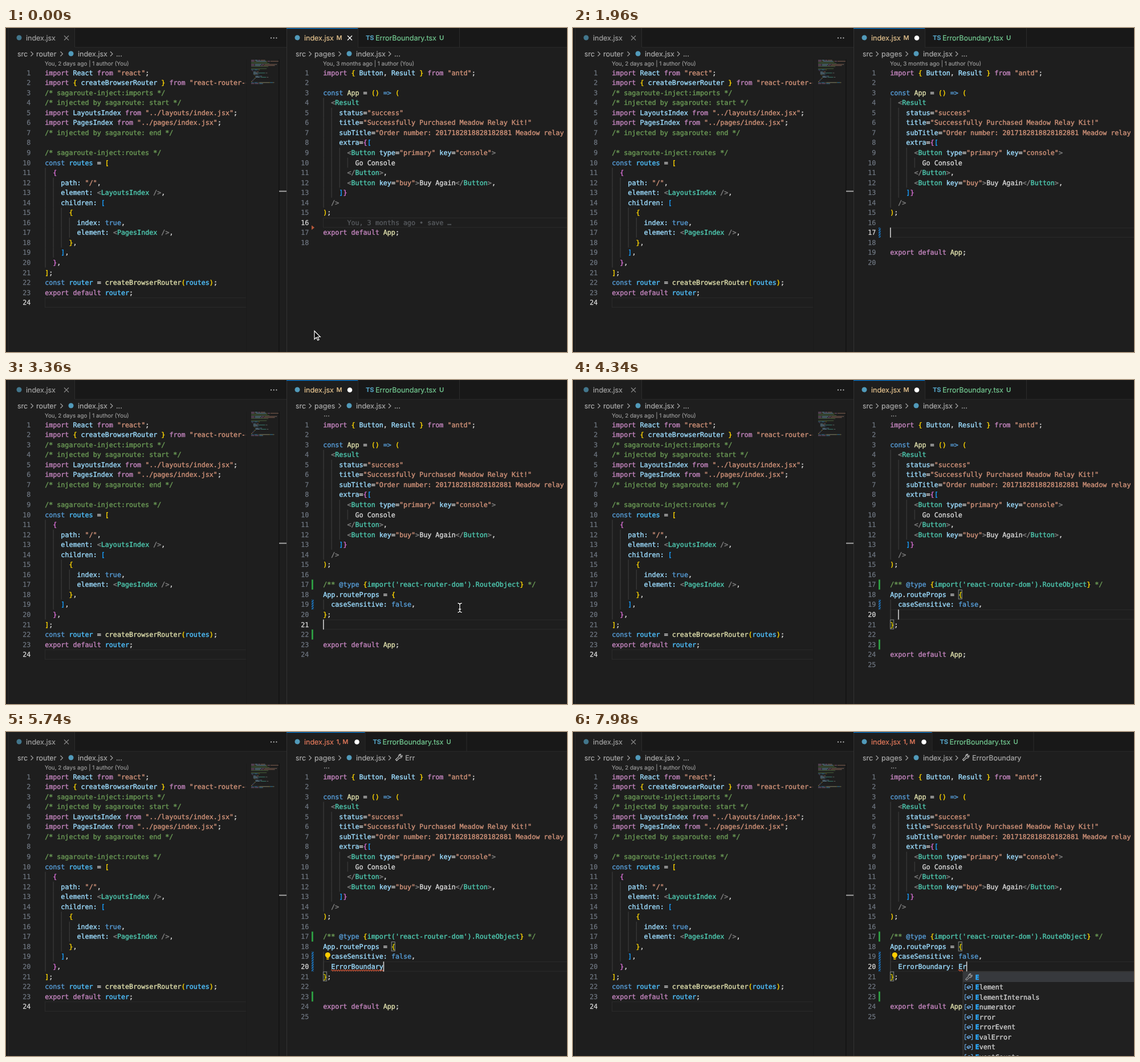
Animation of 984 by 569 pixels, one loop 8 s. Source, as an HTML page:

```html
<!DOCTYPE html>
<html lang="en">
<head>
<meta charset="utf-8">
<title>Route editor</title>
<style>
  html, body { margin: 0; width: 100%; height: 100%; overflow: hidden; background: #1e1e1e; }
  svg { display: block; }
  text { white-space: pre; text-rendering: geometricPrecision; font: 12.5px Inter, sans-serif; stroke-width: .2; }
  .code { font: 11.69px "DejaVu Sans Mono", monospace; stroke-width: .4; }
  .lens { font-size: 9.85px; }
  .badge { font-size: 11px; font-weight: 500; }
  .num { text-anchor: end; stroke-width: .25; }
  .bold { font-weight: 700; }
</style>
</head>
<body>
<svg width="984" height="569" viewBox="0 0 984 569">
  <defs>
    <clipPath id="leftClip"><rect x="0" y="0" width="422" height="569"/></clipPath>
    <clipPath id="mapClip"><rect x="430" y="50" width="48" height="60"/></clipPath>
    <pattern id="hatch" width="3" height="3" patternUnits="userSpaceOnUse" patternTransform="rotate(-45)">
      <rect width="3" height="1.7" fill="#1b81d6"/>
    </pattern>
  </defs>
  <g id="left"></g>
  <g id="right"></g>
</svg>
<script>
const LOOP = 8000, TICK = 70;
const CHAR = 7.04, ROW = 17.54, TOP = 69.9, LEFT = 68.2, RIGHT = 556.2;

const routerFile = `import React from "react";
import { createBrowserRouter } from "react-router-dom";
/* sagaroute-inject:imports */
/* injected by sagaroute: start */
import LayoutsIndex from "../layouts/index.jsx";
import PagesIndex from "../pages/index.jsx";
/* injected by sagaroute: end */

/* sagaroute-inject:routes */
const routes = [
  {
    path: "/",
    element: <LayoutsIndex />,
    children: [
      {
        index: true,
        element: <PagesIndex />,
      },
    ],
  },
];
const router = createBrowserRouter(routes);
export default router;
`.split("\n");

const pageHead = `import { Button, Result } from "antd";

const App = () => (
  <Result
    status="success"
    title="Successfully Purchased Meadow Relay Kit!"
    subTitle="Order number: 2017182818828182881 Meadow relay setup
    extra={[
      <Button type="primary" key="console">
        Go Console
      </Button>,
      <Button key="buy">Buy Again</Button>,
    ]}
  />
);`.split("\n");
const pageTail = ["", "export default App;", ""];

const propsOpen = ["", "/** @type {import('react-router-dom').RouteObject} */", "App.routeProps = {", "  caseSensitive: false,"];
const withProp = line => [...propsOpen, "  " + line, "};", ""];
const words = ["E", "Element", "ElementInternals", "Enumerator", "Error", "ErrorEvent", "EvalError", "Event", "EventCounts"];
const erWords = ["ErrorBoundary", "Error", "ErrorEvent", "EvalError", "Enumerator"];

const steps = [
  [0, { mid: [], line: 16, col: 0, caret: false, blame: "You, 3 months ago • save …", marks: [["del", 17]], crumb: "" }],
  [700, { line: 15, col: 2, caret: true, blame: "" }],
  [910, { blame: "You, 3 months ago • save" }],
  [1190, { caret: false }],
  [1400, { mid: [""], line: 16, col: 0, caret: true, blame: "", marks: [["del", 18]] }],
  [1470, { dirty: true }],
  [1750, { mid: ["", ""], line: 17, marks: [["del", 19]] }],
  [1890, { marks: [["mod", 17]] }],
  [2240, { mid: [...propsOpen, "};", ""], line: 21 }],
  [2450, { folded: true, marks: [["add", 17], ["mod", 19], ["add", 22]] }],
  [2730, { caret: false }],
  [3220, { caret: true }],
  [3500, { line: 19, col: 23, match: true }],
  [3990, { caret: false }],
  [4130, { mid: withProp(""), line: 20, col: 2, caret: true, marks: [["add", 17], ["mod", 19], ["add", 23]] }],
  [4410, { marks: [["add", 17], ["mod", 19], ["mod", 20], ["add", 23]] }],
  [4550, { mid: withProp("E"), col: 3 }],
  [4620, { popup: { col: 3, list: words.slice(1), typed: 1 } }],
  [4760, { mid: withProp("Er"), col: 4 }],
  [4900, { crumb: "E", error: true, wave: [20, 2, 2] }],
  [5040, { crumb: "Er", popup: { col: 3, list: erWords, typed: 2 } }],
  [5320, { mid: withProp("Err"), col: 5, wave: [20, 2, 3], popup: { col: 3, list: erWords.slice(0, 3), typed: 3 } }],
  [5670, { crumb: "Err" }],
  [5740, { mid: withProp("ErrorBoundary"), col: 15, wave: [20, 2, 13], popup: null, bulb: true }],
  [6090, { crumb: "ErrorBoundary" }],
  [6230, { caret: false }],
  [6580, { mid: withProp("ErrorBoundary:"), col: 16, caret: true }],
  [6790, { mid: withProp("ErrorBoundary: "), col: 17 }],
  [7070, { wave: [21, 0, 1] }],
  [7280, { caret: false }],
  [7490, { mid: withProp("ErrorBoundary: E"), col: 18, caret: true }],
  [7560, { popup: { col: 18, list: words, typed: 1 } }],
  [7840, { wave: [20, 17, 1] }],
  [7980, { mid: withProp("ErrorBoundary: Er"), col: 19 }]
];

const rowTop = n => TOP + (n - 1) * ROW;
const baseline = n => rowTop(n) + 12.8;
const escape = s => s.replace(/&/g, "&amp;").replace(/</g, "&lt;");
const text = (x, y, s, fill, cls = "") =>
  `<text x="${x}" y="${y}" fill="${fill}" stroke="${fill}" class="${cls}">${escape(s)}</text>`;
const rect = (x, y, w, h, fill, more = "") => `<rect x="${x}" y="${y}" width="${w}" height="${h}" fill="${fill}" ${more}/>`;
const path = (x, y, d, stroke, width = 1.1, fill = "none") =>
  `<path transform="translate(${x} ${y})" d="${d}" stroke="${stroke}" stroke-width="${width}" fill="${fill}"/>`;
const dot = (x, y, r, fill) => `<circle cx="${x}" cy="${y}" r="${r}" fill="${fill}"/>`;

const WRENCH = "M-5.5 3.5L-.5-1.3A3.6 3.6 0 0 1 3.6-5.8L1.6-3.4 3.3-1.8 5.7-3.8A3.6 3.6 0 0 1 1.2.6L-3.7 5.5Z";
const SYMBOL = "M-4-4.5h-2.5v9h2.5M4-4.5h2.5v9H4M-3.2-.5L.8-2.5 3.2-1V1L-.8 2.8-3.2 1.4ZM-3.2-.5L-.8.8 3.2-1M-.8.8v2";
const CROSS = "M-4-4L4 4M4-4L-4 4";
const CHEVRON = "M-2-4L2 0-2 4";
const ARROW = "M0 0v14.5l3.4-3.2 2.4 5.2 2.2-1-2.4-5h4.6z";
const IBEAM = "M-3.5-8Q-.3-8 0-5.5 .3-8 3.5-8M0-6V6M-3.5 8Q-.3 8 0 5.5 .3 8 3.5 8M-2.2 2.5H2.2";

const brackets = ["#ffd700", "#da70d6", "#179fff"];
const grammar = new RegExp([
  "(?<comment>/\\*\\*? (?!@).*|/\\*\\* |\\*/)", "(?<string>\"[^\"]*\"?)", "(?<type>import\\('[^}]*)",
  "(?<keyword>\\b(?:import|from|export|default)\\b)", "(?<literal>\\b(?:const|true|false)\\b|=>|@type)",
  "(?<plain>Go Console|Buy Again)", "(?<angle></?|/?>)", "(?<bracket>[{}()[\\]])",
  "(?<word>\\w+:?)", "(?<space>\\s+)", "(?<other>.)"
].join("|"), "g");
const palette = {
  comment: "#6a9955", string: "#ce9178", type: "#4ec9b0", keyword: "#c586c0", literal: "#569cd6",
  plain: "#d4d4d4", angle: "#808080", other: "#d4d4d4"
};

function wordColor(word, before, after) {
  if (before.endsWith("<") || before.endsWith("</")) return "#4ec9b0";
  if (after.startsWith("(")) return "#dcdcaa";
  if (word === "App" && !after.startsWith(".")) return "#dcdcaa";
  return /^route[rs]$/.test(word) ? "#4fc1ff" : "#9cdcfe";
}

function tokenize(lines) {
  let depth = 0;
  return lines.map(line => {
    const tokens = [];
    for (const m of line.matchAll(grammar)) {
      const kind = Object.keys(m.groups).find(k => m.groups[k] !== undefined);
      const s = m[0];
      if (kind === "space") continue;
      let color = palette[kind];
      if (kind === "word") color = wordColor(s, line.slice(0, m.index), line.slice(m.index + s.length));
      if (kind === "bracket") {
        const opens = "{[(".includes(s);
        if (!opens) depth--;
        color = brackets[(depth + 3) % 3];
        if (opens) depth++;
      }
      tokens.push({ col: m.index, s, color });
    }
    return tokens;
  });
}

function drawCode(lines, x0, active) {
  let out = rect(x0 + .3, rowTop(active) + .5, 450, ROW - 1, "none", 'stroke="#2b2b2b"');
  tokenize(lines).forEach((tokens, i) => {
    const n = i + 1, indent = lines[i].search(/\S|$/);
    for (let c = 0; c < indent; c += 2) out += rect(x0 + c * CHAR + .3, rowTop(n), 1, ROW, "#404040");
    out += text(x0 - 24.9, baseline(n), String(n), n === active ? "#dcdcdc" : "#6e7681", "code num");
    for (const t of tokens) out += text(x0 + t.col * CHAR, baseline(n), t.s, t.color, "code");
  });
  return out;
}

function drawCrumbs(x, folder, symbol) {
  const gray = "#a9a9a9";
  const link = (dx, s) => text(x + dx, 49.5, s, gray);
  const sep = dx => path(x + dx, 45.5, CHEVRON, gray);
  const end = symbol ? path(x + 181, 45, WRENCH, "#cccccc") + link(192, symbol) : link(173, "...");
  return link(0, "src") + sep(25.5) + link(33, folder) + sep(77.5) +
    dot(x + 94, 45, 4.5, "#519aba") + link(106, "index.jsx") + sep(165) + end;
}

function drawLeft() {
  const map = tokenize(routerFile).map((tokens, i) => tokens.map(t =>
    rect(430 + t.col * .94, 56 + i * 1.87, t.s.length * .94, 1.1, t.color, 'opacity=".5"')).join("")).join("");
  return rect(0, 0, 3, 569, "#181818") + rect(3, 0, 1, 569, "#2b2b2b") +
    rect(121, 0, 371, 34, "#181818") + rect(121, 33.5, 371, 1, "#2b2b2b") + rect(120, 0, 1, 34, "#2b2b2b") +
    dot(23, 17, 4.5, "#42768c") + text(35, 21.5, "index.jsx", "#a0a0a0") + path(106, 17.5, CROSS, "#8a8a8a") +
    [465, 469.7, 474.4].map(x => dot(x, 17.5, 1.1, "#cccccc")).join("") +
    drawCrumbs(20, "router") + text(68, 66, "You, 2 days ago | 1 author (You)", "#999999", "lens") +
    `<g clip-path="url(#leftClip)">${drawCode(routerFile, LEFT, 24)}</g>` +
    rect(421, 55, 1, 514, "#1a1a1a") + `<g clip-path="url(#mapClip)">${map}</g>` +
    rect(478, 55, 1.5, 514, "#121212") + rect(479, 285.7, 13, 2, "#a0a0a0");
}

function drawTabs(s) {
  const shift = s.error ? 12.5 : 0, edge = 617 + shift;
  const name = s.error ? "#e2795b" : "#e2c08d";
  return rect(edge, 0, 984 - edge, 34, "#181818") + rect(edge, 33.5, 984 - edge, 1, "#2b2b2b") +
    rect(edge, 0, 1, 34, "#2b2b2b") + rect(edge + 178, 0, 1, 34, "#2b2b2b") +
    rect(492, 0, 125 + shift, 1.2, "#0078d4") +
    dot(511, 17, 4.5, "#519aba") + text(523, 21.5, "index.jsx", name) +
    text(579.5, 21, s.error ? "1, M" : "M", name, "badge") +
    (s.dirty ? dot(603 + shift, 17.5, 4.3, "#ffffff") : path(603, 17.5, CROSS, "#ffffff", 1.3)) +
    `<g transform="translate(${shift})">` + text(631, 20.5, "TS", "#519aba", "badge bold") +
    text(648, 21.5, "ErrorBoundary.tsx", "#73c991") + text(760, 21, "U", "#73c991", "badge") + "</g>";
}

function drawMark([kind, n]) {
  const y = rowTop(n);
  if (kind === "del") return path(536, y, "M0-4L5 0 0 4Z", "none", 0, "#b5573a");
  return kind === "add" ? rect(536, y, 2.8, ROW, "#2ea043") : rect(536, y, 3.6, ROW, "url(#hatch)");
}

function drawWave([n, col, len]) {
  let d = "M0 0";
  for (let x = 0; x < len * CHAR - 1; x += 4) d += "q1-2.4 2 0t2 0";
  return path(RIGHT + col * CHAR, rowTop(n) + 15.5, d, "#f0603c");
}

function drawPopup({ col, list, typed }) {
  const x = RIGHT + col * CHAR + 1.2, y = rowTop(21) + .3;
  let out = rect(x, y, 440, list.length * ROW + 2, "#202020", 'stroke="#454545"') +
    rect(x + .5, y + .5, 439, ROW, "#37393d");
  list.forEach((word, i) => {
    const base = y + 13.5 + i * ROW, mid = base - 4;
    const property = word === "E" || word === "ErrorBoundary";
    out += path(x + 10, mid, property ? WRENCH : SYMBOL, property ? "#cccccc" : "#75beff", 1) +
      text(x + 21.5, base, word.slice(0, typed), "#2aaaff", "code bold") +
      text(x + 21.5 + typed * CHAR, base, word.slice(typed), "#cccccc", "code");
  });
  return out;
}

const ease = p => p * p * (3 - 2 * p);
const glide = (t, from, to, a, b) => {
  const p = ease(Math.min(1, Math.max(0, (t - from) / (to - from))));
  return [a[0] + (b[0] - a[0]) * p, a[1] + (b[1] - a[1]) * p];
};

function drawMouse(t) {
  let at;
  if (t < 1400) at = glide(t, 0, 700, [541, 532], [670, 331]);
  else if (t >= 2730 && t < 4130) at = glide(t, 2660, 3360, [670, 331], [796, 400]);
  else return "";
  if (at[0] < 550) return path(...at, ARROW, "#ffffff", 1.2, "#000000");
  return path(...at, IBEAM, "#000000", 3) + path(...at, IBEAM, "#ffffff", 1.3);
}

function drawRight(s, t) {
  const lines = [...pageHead, ...s.mid, ...pageTail];
  let out = rect(492, 0, 1, 569, "#333333") + drawTabs(s) + drawCrumbs(508, "pages", s.crumb);
  out += s.folded ? text(557, 64, "...", "#999999") : text(556, 66, "You, 3 months ago | 1 author (You)", "#999999", "lens");
  out += drawCode(lines, RIGHT, s.line) + s.marks.map(drawMark).join("");
  if (s.blame) out += text(RIGHT + (lines[s.line - 1].length + 6) * CHAR, baseline(s.line), s.blame, "#55585c", "code");
  if (s.match) {
    const close = lines.indexOf("};") + 1;
    for (const [n, col] of [[18, 17], [close, 0]])
      out += rect(RIGHT + col * CHAR + .3, rowTop(n) + .5, CHAR - 1, ROW - 1.5, "#00640018", 'stroke="#888888"');
  }
  if (s.wave) out += drawWave(s.wave);
  if (s.bulb) out += dot(564.3, 391.5, 4.6, "#ffcc00") + rect(562.3, 394, 4, 5.5, "#ffcc00") + rect(562.3, 397, 4, .8, "#1e1e1e");
  if (s.caret) out += rect(RIGHT + s.col * CHAR - .2, rowTop(s.line), 1.6, ROW, "#cfcfcf");
  if (s.popup) out += drawPopup(s.popup);
  return out + drawMouse(t);
}

const right = document.getElementById("right");
document.getElementById("left").innerHTML = drawLeft();
let shown = -1;

function frame() {
  const tick = Math.floor(performance.now() % LOOP / TICK);
  if (tick !== shown) {
    shown = tick;
    const t = tick * TICK;
    const state = Object.assign({}, ...steps.filter(([at]) => at <= t).map(([, change]) => change));
    right.innerHTML = drawRight(state, t);
  }
  requestAnimationFrame(frame);
}
frame();
</script>
</body>
</html>
```
